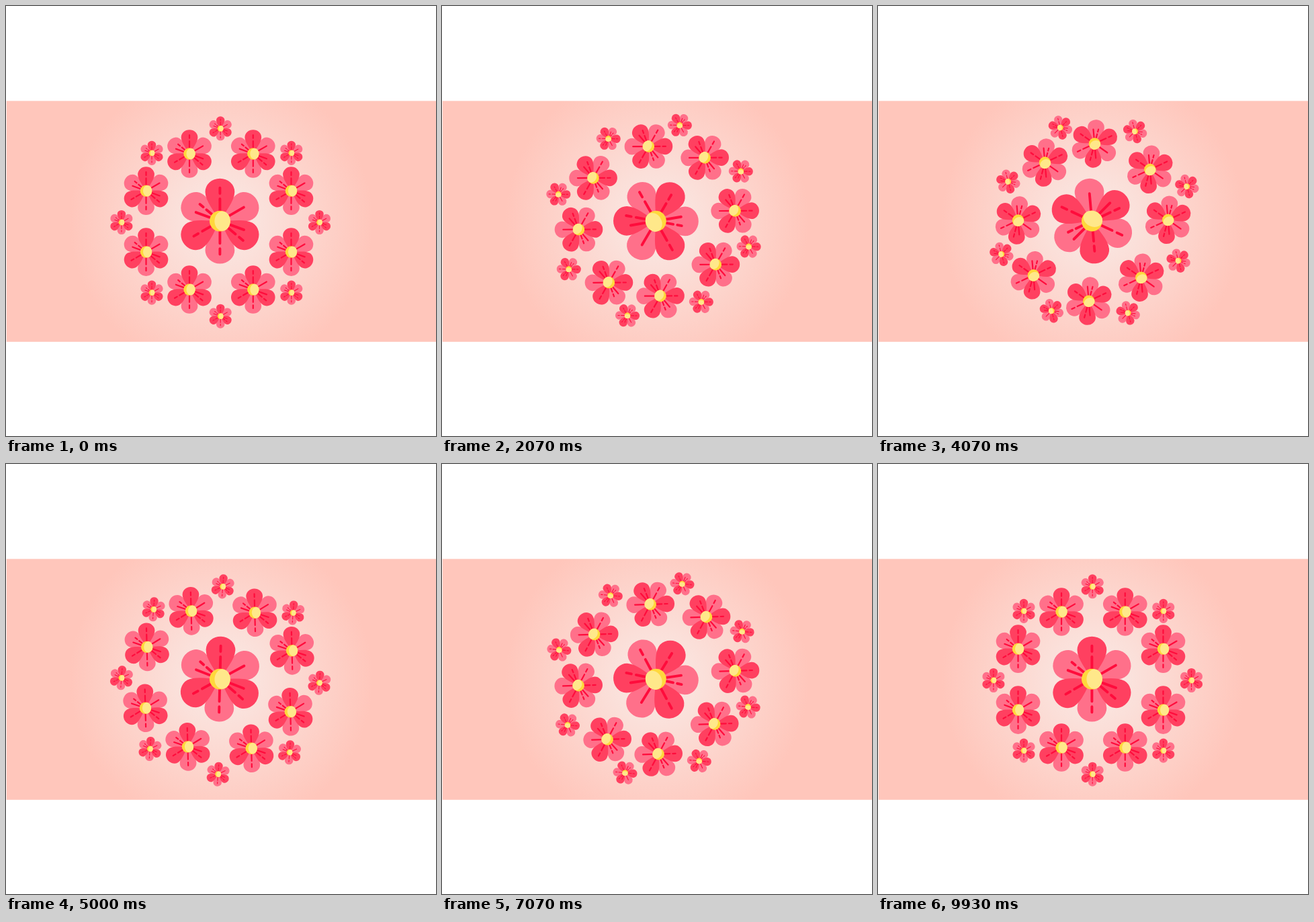
Recreate the animation shown at these times as an HTML page with a canvas. Size 640x640 px, loop 10 s.

```html
<!DOCTYPE html>
<html lang="en">
<head>
<meta charset="utf-8">
<title>Turning flowers</title>
<style>
  html, body { margin: 0; width: 100%; height: 100%; overflow: hidden; background: #fff; }
  canvas { display: block; width: 640px; height: 640px; }
</style>
</head>
<body>
<canvas id="stage" width="640" height="640"></canvas>
<script>
const ctx = document.getElementById('stage').getContext('2d');
const LOOP = 10000;
const TAU = Math.PI * 2;
const CENTER = { x: 318.4, y: 320.1 };
const DARK = '#ff4060', LIGHT = '#ff708a', VEIN = '#ff0c3c';

const petal = new Path2D(
  'M0 0C-8 -14 -21.5 -29 -21.9 -43.3A21.9 20.1 0 0 1 21.9 -43.3C21.5 -29 8 -14 0 0Z');
const veins = buildVeins();

// Four points on an ellipse, a quarter turn apart.
function quad(cx, cy, rx, ry, phase) {
  return Array.from({ length: 4 }, (_, i) => {
    const a = phase + i * TAU / 4;
    return { x: cx + rx * Math.cos(a), y: cy + ry * Math.sin(a) };
  });
}

// Each ring flower also spins on its own axis: `spin` is relative to the ring's turn.
const rings = [
  {
    scale: 0.285, spin: 2,
    points: [...quad(319.2, 322, 147.3, 139.7, 0), ...quad(320.9, 322.7, 146.9, 146.9, TAU / 8)]
  },
  {
    scale: 0.565, spin: -2,
    points: [...quad(320.4, 321, 67, 142.9, TAU / 8), ...quad(316.5, 320.6, 152.7, 64.3, TAU / 8)]
  }
];

// Every third petal has a forked vein; the others have one, mostly broken into a line and a dash.
function buildVeins() {
  const path = new Path2D();
  const segment = (angle, from, to) => {
    const c = Math.cos(angle), s = Math.sin(angle);
    path.moveTo(c * from, s * from);
    path.lineTo(c * to, s * to);
  };
  const solid = (angle, reach) => segment(angle, 14, reach);
  const broken = (angle, reach) => {
    segment(angle, 14, reach * 0.67);
    segment(angle, reach * 0.83, reach);
  };
  const fork = TAU / 36;
  for (let i = 0; i < 6; i++) {
    const axis = (i - 1.5) * TAU / 6;
    if (i % 3 === 2) {
      solid(axis - fork, 38);
      broken(axis + fork, i < 3 ? 45 : 39);
    } else if (i === 1) {
      solid(axis, 41);
    } else {
      broken(axis, i === 4 ? 45 : 49.5);
    }
  }
  return path;
}

function drawPetals(color, first) {
  ctx.fillStyle = color;
  for (let i = first; i < 6; i += 2) {
    ctx.save();
    ctx.rotate(i * TAU / 6);
    ctx.fill(petal);
    ctx.restore();
  }
}

function disc(color, x, rx, ry) {
  ctx.fillStyle = color;
  ctx.beginPath();
  ctx.ellipse(x, 0, rx, ry, 0, 0, TAU);
  ctx.fill();
}

function drawFlower(x, y, scale, angle) {
  ctx.save();
  ctx.translate(x, y);
  ctx.rotate(angle);
  ctx.scale(scale, scale);
  drawPetals(LIGHT, 1);
  drawPetals(DARK, 0);

  ctx.strokeStyle = VEIN;
  ctx.lineWidth = 3.9;
  ctx.lineCap = 'round';
  ctx.stroke(veins);

  disc('#ffd83c', 0, 15.4, 15.4);
  disc('#ffe88a', 3.7, 11.7, 14.6);
  ctx.restore();
}

function drawRing({ points, scale, spin }, turn) {
  const c = Math.cos(turn), s = Math.sin(turn);
  for (const p of points) {
    const dx = p.x - CENTER.x, dy = p.y - CENTER.y;
    drawFlower(CENTER.x + dx * c - dy * s, CENTER.y + dx * s + dy * c, scale, turn * (1 + spin));
  }
}

const glow = ctx.createRadialGradient(320, 320, 0, 320, 320, 226);
glow.addColorStop(0, '#f9ebe7');
glow.addColorStop(1, '#ffc6bb');

function drawBackground() {
  ctx.fillStyle = '#fff';
  ctx.fillRect(0, 0, 640, 640);
  ctx.fillStyle = glow;
  ctx.fillRect(0.8, 141.3, 639.2, 358.5);
}

// Shown at 14 steps a second; each picks the next position of a 25-per-second turn.
function turnAt(ms) {
  const step = Math.floor((Math.floor(ms / 10) * 10 + 5) * 14 / 1000) % 140;
  return Math.ceil(step * 25 / 14) / 249 * 2 * TAU;
}

function draw(ms) {
  const turn = turnAt(ms);
  drawBackground();
  for (const ring of rings) drawRing(ring, turn);
  drawFlower(CENTER.x, CENTER.y, 1, turn);
}

let start = null;
function tick(now) {
  if (start === null) start = now;
  draw((now - start) % LOOP);
  requestAnimationFrame(tick);
}
draw(0);
requestAnimationFrame(tick);
</script>
</body>
</html>
```
